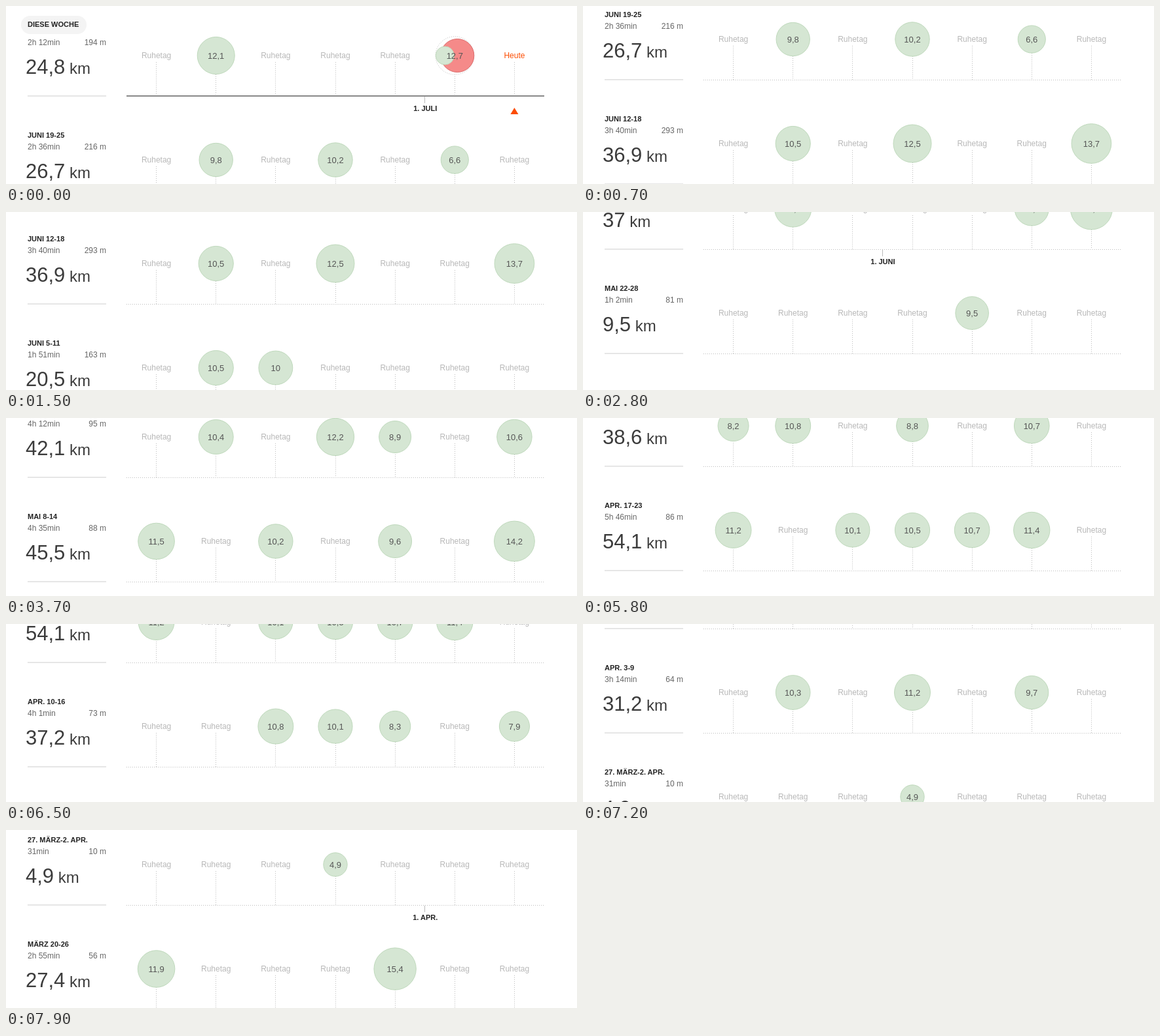
Animation of 872x273 px, one loop 8000 ms. Source, as an HTML page:

```html
<!DOCTYPE html>
<html lang="de">
<head>
<meta charset="utf-8">
<style>
  html, body { margin: 0; width: 100%; height: 100%; overflow: hidden; background: #fff; }
  svg { display: block; font-family: "Liberation Sans", Arial, sans-serif; }
  line { stroke: #bbb; shape-rendering: crispEdges; }
  .dots { stroke-dasharray: 1 2; }
  .rule { stroke: #e6e6e6; stroke-width: 2; }
  .today { stroke: #888; stroke-width: 2; }
  .bold { font-weight: bold; font-size: 11px; fill: #222; }
  .info { font-size: 12px; fill: #666; }
  .total { font-size: 31px; fill: #3c3c3c; }
  .unit { font-size: 24px; }
  .rest { font-size: 12px; fill: #b8b8b8; }
  .now { font-size: 12px; fill: #fc4c02; }
  .km { font-size: 13px; fill: #555; }
  .run { fill: #d5e6d3; stroke: #bfd9bc; }
  .race { fill: #f58a89; stroke: #dc6b6b; }
  .plan { fill: none; stroke: #bbb; stroke-dasharray: 1 2; }
  .mid { text-anchor: middle; }
  .end { text-anchor: end; }
</style>
</head>
<body>
<svg width="872" height="273"><g id="list"></g></svg>
<script>
const LEFT = 184, DAY = 638 / 7, AXIS = 138, PITCH = 160, LOOP = 8000;

// title | duration | climb | total | days | weekday of the 1st, month
const weeks = `DIESE WOCHE|2h 12min|194 m|24,8|- 12,1 - - - 12,7* Heute|5 JULI
JUNI 19-25|2h 36min|216 m|26,7|- 9,8 - 10,2 - 6,6 -
JUNI 12-18|3h 40min|293 m|36,9|- 10,5 - 12,5 - - 13,7
JUNI 5-11|1h 51min|163 m|20,5|- 10,5 10 - - - -
MAI 29-JUNI 4|3h 38min|204 m|37|- 11,7 - - - 10,1 15,2|3 JUNI
MAI 22-28|1h 2min|81 m|9,5|- - - - 9,5 - -
MAI 15-21|4h 12min|95 m|42,1|- 10,4 - 12,2 8,9 - 10,6
MAI 8-14|4h 35min|88 m|45,5|11,5 - 10,2 - 9,6 - 14,2
MAI 1-7|3h 31min|21 m|34,8|11 12,3 - - - - 11,4|0 MAI
APR. 24-30|4h 8min|43 m|38,6|8,2 10,8 - 8,8 - 10,7 -
APR. 17-23|5h 46min|86 m|54,1|11,2 - 10,1 10,5 10,7 11,4 -
APR. 10-16|4h 1min|73 m|37,2|- - 10,8 10,1 8,3 - 7,9
APR. 3-9|3h 14min|64 m|31,2|- 10,3 - 11,2 - 9,7 -
27. MÄRZ-2. APR.|31min|10 m|4,9|- - - 4,9 - - -|5 APR.
MÄRZ 20-26|2h 55min|56 m|27,4|11,9 - - - 15,4 - -`.split('\n').map(row => row.split('|'));

const text = (x, y, cls, s) => `<text x="${x}" y="${y}" class="${cls}">${s}</text>`;
const line = (x1, y1, x2, y2, cls = '') =>
  `<line x1="${x1}" y1="${y1}" x2="${x2}" y2="${y2}" class="${cls}"/>`;
const circle = (x, y, r, cls) => `<circle cx="${x}" cy="${y}" r="${r}" class="${cls}"/>`;
const pixel = x => Math.floor(x) + .5;

// Coordinates are relative to the week's axis.
function drawDay(value, i) {
  const x = LEFT + DAY * (i + .5), y = -62, km = parseFloat(value.replace(',', '.'));
  const stem = from => line(pixel(x), from, pixel(x), 0, 'dots');
  if (value === 'Heute')
    return stem(y + 10) + text(x, y + 4, 'now mid', value) +
      `<path d="M${x} 18l6 10h-12z" fill="#fc4c02"/>`;
  if (!km) return stem(y + 10) + text(x, y + 4, 'rest mid', 'Ruhetag');
  const r = 8.2 * Math.sqrt(km);
  const shape = value.endsWith('*')
    ? circle(x, y, r, 'plan') + circle(x + 4, y, 25.5, 'race') + circle(x - 15, y, 14, 'run')
    : circle(x, y, r, 'run');
  return stem(y + Math.round(r)) + shape + text(x, y + 4.5, 'km mid', value.replace('*', ''));
}

function drawWeek([title, time, climb, total, days, month], i) {
  const top = AXIS + i * PITCH + (i > 8);
  let s = i ? '' : '<rect x="23" y="-123" width="100" height="28" rx="14" fill="#f4f4f4"/>';
  s += text(33, i ? -96 : -106, 'bold', title)
    + text(33, -78, 'info', time) + text(153, -78, 'info end', climb)
    + text(30, -34, 'total', `${total}<tspan class="unit"> km</tspan>`)
    + line(33, 0, 153, 0, 'rule')
    + days.split(' ').map(drawDay).join('')
    + (i ? line(LEFT, .5, 821, .5, 'dots') : line(LEFT, 0, 822, 0, 'today'));
  if (month) {
    const [day, name] = month.split(' '), x = LEFT + DAY * day;
    s += line(pixel(x), 1, pixel(x), 11) + text(x + .5, 23, 'bold mid', '1. ' + name);
  }
  return `<g transform="translate(0 ${top})">${s}</g>`;
}

const list = document.getElementById('list');
list.innerHTML = weeks.map(drawWeek).join('');

// Scroll position: [ms, px], with pauses between the strokes
const scroll = [[0, 0], [700, 185], [900, 185], [1300, 290], [1400, 290], [1500, 317],
  [2800, 721], [4500, 1261], [4700, 1310], [5000, 1310], [5200, 1390], [5500, 1390],
  [5800, 1505], [6000, 1560], [6100, 1560], [6500, 1680], [7900, 2104]];

function scrollAt(t) {
  const k = Math.max(1, scroll.findIndex(p => p[0] >= t));
  const [t0, y0] = scroll[k - 1], [t1, y1] = scroll[k];
  return Math.round(y0 + (y1 - y0) * (t - t0) / (t1 - t0));
}

function frame() {
  const t = Math.floor(performance.now() % LOOP / 100) * 100;
  list.setAttribute('transform', `translate(0 ${-scrollAt(t)})`);
  requestAnimationFrame(frame);
}
frame();
</script>
</body>
</html>
```
